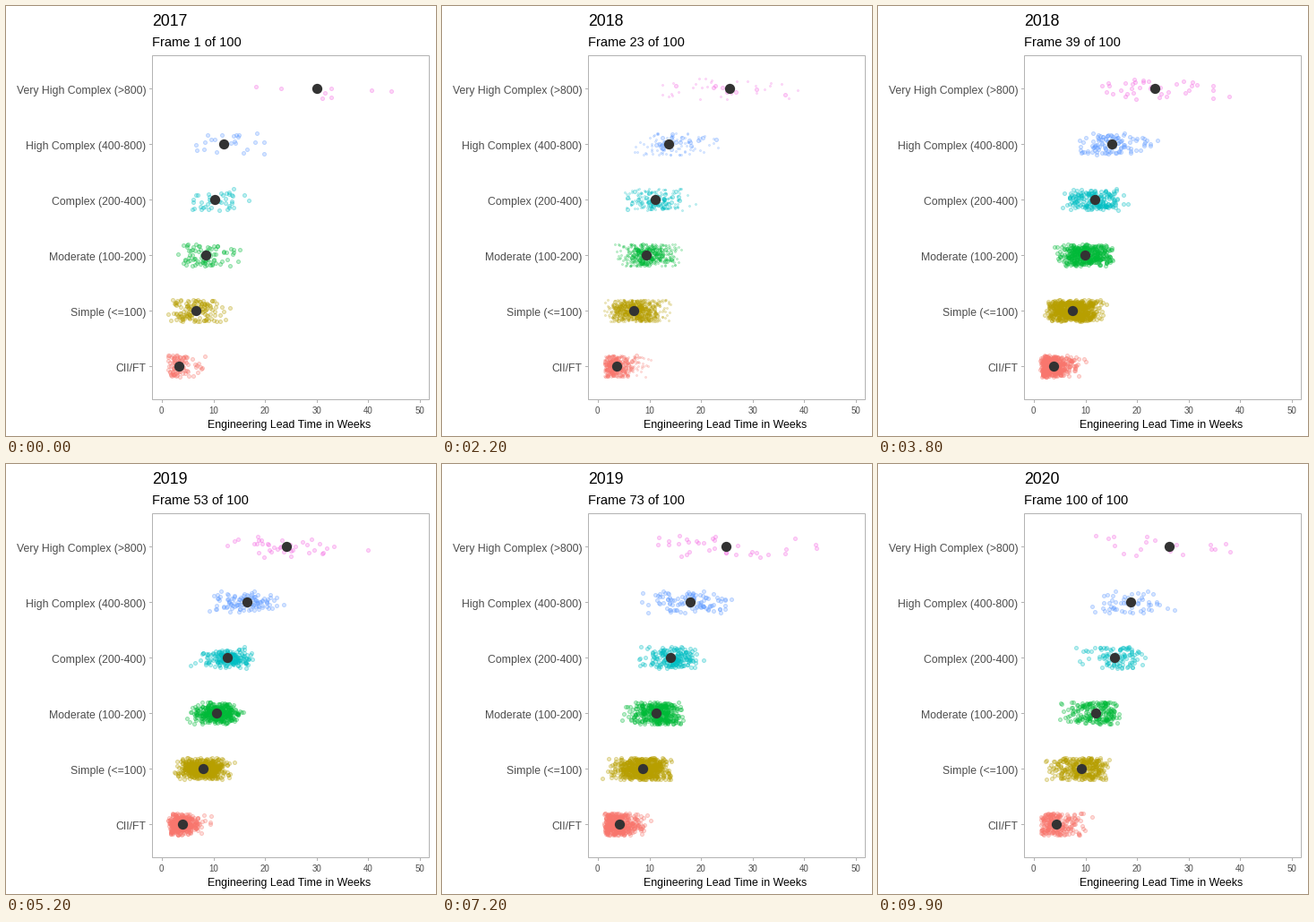
Recreate the animation shown at these times as a matplotlib script. Size 480 px wide and 480 px high, loop 10 s.

```python
import numpy as np
import matplotlib.pyplot as plt
from matplotlib.animation import FuncAnimation
from matplotlib.colors import to_rgb
from matplotlib.patches import Rectangle

plt.rcParams["font.family"] = "Liberation Sans"

SIZE, FRAMES, FIRST_YEAR = 480, 100, 2017
GREY, INK = "#B3B3B3", "#4D4D4D"
JITTER = 12.4
SHARE = (0.21, 1, 0.92, 0.5)  # observations per year, relative to the peak

# label, colour, peak count, (shortest, longest, tightness), mean weeks per year
ROWS = [
    ("Very High Complex (>800)", "#F564E3", 37, (10, 49, 4.5), (30, 23.3, 24.6, 26.2)),
    ("High Complex (400-800)", "#619CFF", 110, (5.5, 31, 9), (12, 14.7, 17.7, 18.8)),
    ("Complex (200-400)", "#00BFC4", 200, (3.5, 22, 9), (10.3, 11.4, 13.6, 15.7)),
    ("Moderate (100-200)", "#00BA38", 410, (2.5, 17, 6), (8.5, 9.7, 11.2, 12)),
    ("Simple (<=100)", "#B79F00", 650, (0.7, 14.6, 5), (6.6, 7.2, 8.5, 9.2)),
    ("CII/FT", "#F8766D", 450, (1.2, 14, 6), (3.3, 3.7, 4.1, 4.4)),
]

rng = np.random.default_rng(2017)


def week_x(week):
    return 174 + 5.76 * np.asarray(week)


def row_y(r):
    return 92 + 62 * r


def sample(r, year):
    """Jittered observations of one row in one year, as stage positions."""
    _, _, peak, (lo, hi, tight), mean = ROWS[r]
    n = round(peak * SHARE[year])
    mu = (mean[year] - lo) / (hi - lo)
    weeks = lo + (hi - lo) * rng.beta(mu * tight, (1 - mu) * tight, n)
    return np.column_stack([week_x(weeks), row_y(r) + rng.uniform(-JITTER, JITTER, n)])


def segment(year):
    """Start, end, kind (-1 leaves, 0 stays, 1 enters) and colour per point."""
    parts = []
    for row, years in zip(ROWS, data):
        a, b = years[year], years[year + 1]
        m = min(len(a), len(b))
        kind = np.repeat([0, -1, 1], [m, len(a) - m, len(b) - m])
        parts.append((np.vstack([a, b[m:]]), np.vstack([b[:m], a[m:], b[m:]]),
                      kind, np.tile(to_rgb(row[1]), (len(kind), 1))))
    return [np.concatenate(p) for p in zip(*parts)]


data = [[sample(r, k) for k in range(4)] for r in range(len(ROWS))]
segments = [segment(k) for k in range(3)]
mean_x = week_x([row[4] for row in ROWS])
mean_y = row_y(np.arange(len(ROWS)))

fig = plt.figure(figsize=(SIZE / 72, SIZE / 72), dpi=72, facecolor="white")
ax = fig.add_axes([0, 0, 1, 1])
ax.set(xlim=(0, SIZE), ylim=(SIZE, 0))
ax.axis("off")


def line(xs, ys):
    ax.plot(xs, ys, color=GREY, lw=1, solid_capstyle="butt", snap=False)


def label(x, y, s, size, color="black", ha="left"):
    return ax.text(x, y, s, fontsize=size, color=color, ha=ha, va="baseline")


ax.add_patch(Rectangle((163.5, 55.5), 309, 384, fill=False, ec=GREY, lw=1, snap=False))
for r, row in enumerate(ROWS):
    line([160, 163], [row_y(r) + 0.5] * 2)
    label(156.5, row_y(r) + 6, row[0], 12.3, INK, "right")
for week in range(0, 51, 10):
    x = round(float(week_x(week)))
    line([x + 0.5] * 2, [440, 443])
    label(x - 0.3, 455, str(week), 9.7, INK, "center")
label(316, 471, "Engineering Lead Time in Weeks", 12.35, ha="center")
title = label(163, 22, "", 17.6)
subtitle = label(163, 45, "", 14.6)

cloud = ax.scatter([], [], linewidths=1, zorder=3)
centres = ax.scatter([], [], s=11.3 ** 2, color="#333333", linewidths=0, zorder=4)


def draw(i):
    pos = 3 * i / (FRAMES - 1)
    year = min(int(pos), 2)
    f = pos - year
    start, end, kind, rgb = segments[year]

    # newcomers fade and grow in; leavers hold still until the year ends
    fade = np.where(kind == 1, f, np.where((kind == -1) & (f >= 1), 0, 1))
    diameter = np.where((kind == 1) & (f < 0.72), 2, 4)
    cloud.set_offsets(np.round(start + (end - start) * f) + 0.5)
    cloud.set_sizes(diameter ** 2)
    cloud.set_facecolors(np.column_stack([rgb, 0.25 * fade]))
    cloud.set_edgecolors(np.column_stack([rgb, 0.36 * fade]))

    x = mean_x[:, year] * (1 - f) + mean_x[:, year + 1] * f
    centres.set_offsets(np.column_stack([np.round(x), mean_y]))
    title.set_text(str(FIRST_YEAR + int(pos + 0.5)))
    subtitle.set_text(f"Frame {i + 1} of {FRAMES}")
    return cloud, centres, title, subtitle


anim = FuncAnimation(fig, draw, frames=FRAMES, interval=100, repeat=True)
plt.show()
```
